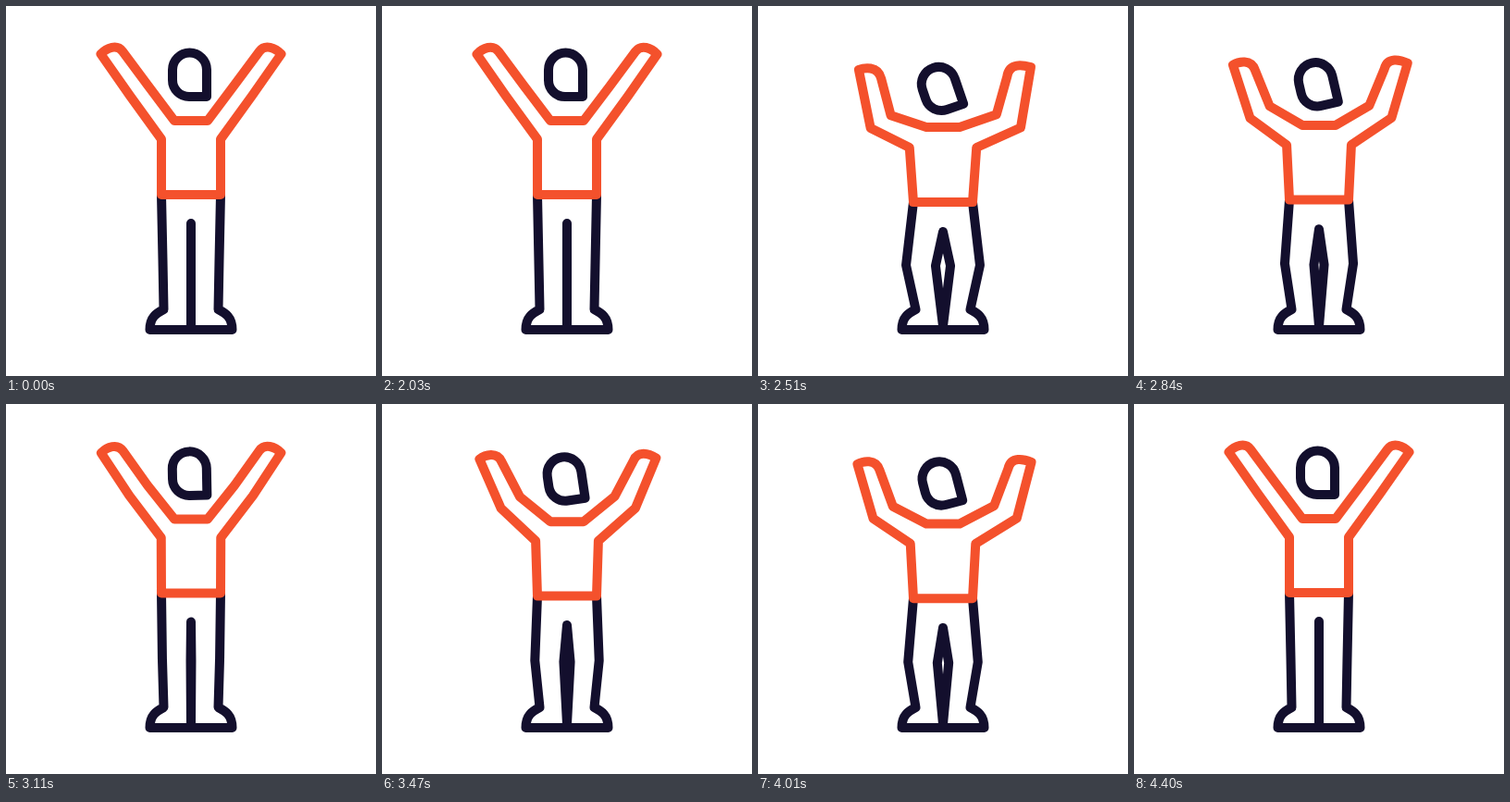
An HTML page that plays this animation: 400 px wide and 400 px high, repeating every 4.46 s.

```html
<!DOCTYPE html>
<html lang="en">
<head>
<meta charset="utf-8">
<title>Stretch</title>
<style>
  html, body { margin: 0; width: 100%; height: 100%; overflow: hidden; background: #fff; }
  svg { display: block; width: 100vw; height: 100vh; }
  path { fill: none; stroke-width: 10; stroke-linecap: round; stroke-linejoin: round; }
  .navy { stroke: #130f2d; }
  .orange { stroke: #f4512c; }
</style>
</head>
<body>
<svg viewBox="0 0 400 400">
  <path id="head" class="navy" d="M217 98H198A18 18 0 0 1 180 80V69A18.5 18.5 0 0 1 217 69Z"/>
  <path id="legs" class="navy"/>
  <path id="crease" class="navy"/>
  <path id="shirt" class="orange"/>
</svg>
<script>
const LOOP = 4460, START = 2000, END = 4400, STEP = 30, SQUAT = 1200;
const $ = id => document.getElementById(id);

// Points as [x, y, squatX, squatY]; k runs from 0 (upright) to 1 (squat).
const at = ([x, y, sx, sy], k) => [x + (sx - x) * k, y + (sy - y) * k];
const mirror = ([x, y, sx, sy]) => [400 - x, y, 400 - sx, sy];

const HIP = [168, 204, 168, 212.5];
const ARMPIT = [168, 144, 163.5, 153.5];
const SHOULDER = [182, 124, 182, 131.5];
const KNEE = [169.5, 275, 159.5, 280.5];
const CROTCH = [200, 235, 200, 244.5];
const INNER_KNEE = [200, 277, 191.5, 281];

// Elbow, fingertip, two curve handles, wrist, inner elbow
const LEFT_ARM = [
  [134, 97, 121, 134], [102.5, 52, 109.3, 70], [109, 45, 115, 68],
  [120, 41, 130, 65.5], [126, 49, 133.5, 80], [153.5, 86, 143, 120]
];
const RIGHT_ARM = [
  [266, 97, 285, 133.5], [297.5, 52, 294.8, 67], [291, 45, 286, 65],
  [280, 41, 271, 62], [274, 49, 269, 78], [246.5, 86, 258.5, 119]
];

function armPath(arm, k) {
  const [elbow, tip, c1, c2, wrist, inner] = arm.map(p => at(p, k));
  return `L${elbow}L${tip}C${c1} ${c2} ${wrist}L${inner}`;
}

// The same arm drawn from the shoulder outwards
function armBack(arm, k) {
  const [elbow, tip, c1, c2, wrist, inner] = arm.map(p => at(p, k));
  return `L${inner}L${wrist}C${c2} ${c1} ${tip}L${elbow}`;
}

function draw(k) {
  const pt = p => at(p, k), alt = p => at(mirror(p), k);

  $('shirt').setAttribute('d',
    `M${pt(HIP)}L${pt(ARMPIT)}${armPath(LEFT_ARM, k)}L${pt(SHOULDER)}L${alt(SHOULDER)}` +
    `${armBack(RIGHT_ARM, k)}L${alt(ARMPIT)}L${alt(HIP)}Z`);

  $('legs').setAttribute('d',
    `M${pt(HIP)}L${pt(KNEE)}L170.5 328C163 332 155.5 336 155.5 350` +
    `H244.5C244.5 336 237 332 229.5 328L${alt(KNEE)}L${alt(HIP)}`);

  $('crease').setAttribute('d',
    `M${pt(CROTCH)}L${pt(INNER_KNEE)}L200 346L${alt(INNER_KNEE)}Z`);

  $('head').setAttribute('transform',
    `translate(${-1.5 * k} ${16 * k}) rotate(${-20 * k} 198.5 74.5)`);
}

function squat(t) {
  if (t < START + STEP || t >= END) return 0;
  const stepped = Math.floor((t - START) / STEP) * STEP;
  return (1 - Math.cos(2 * Math.PI * stepped / SQUAT)) / 2;
}

const origin = performance.now();
function tick() {
  draw(squat((performance.now() - origin) % LOOP));
  requestAnimationFrame(tick);
}
tick();
</script>
</body>
</html>
```
